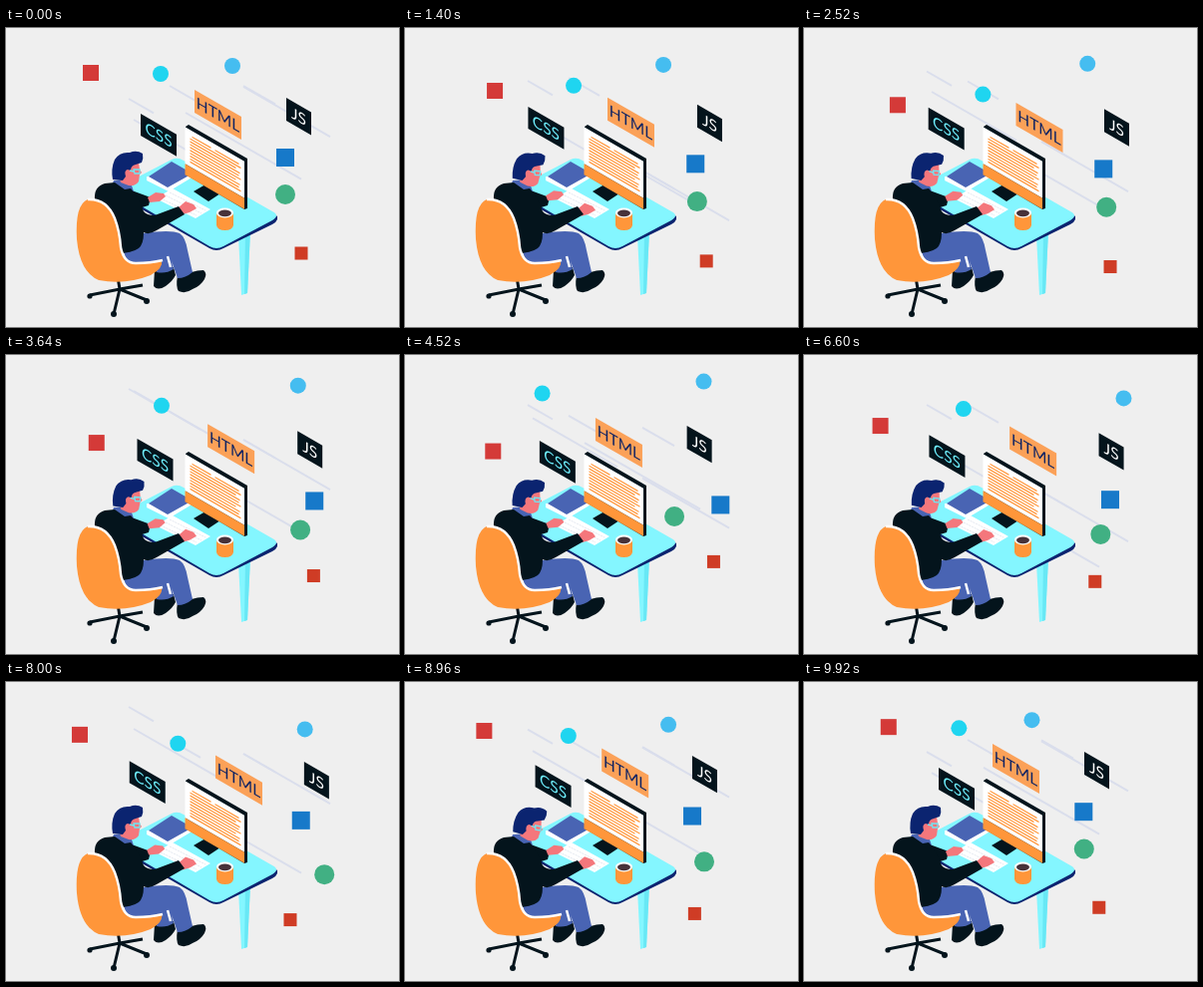
Animation, 394 px wide and 300 px high, one loop 9960 ms. Source, as an HTML page:

```html
<!DOCTYPE html>
<html lang="en">
<head>
<meta charset="utf-8">
<title>Developer at work</title>
<style>
html, body { margin: 0; width: 100%; height: 100%; overflow: hidden; background: #efefef; }
svg { display: block; width: 100vw; height: 100vh; }
text { font: 15.5px Lato, sans-serif; text-anchor: middle; }
.track { stroke: #dadeec; stroke-width: 2; }
.ink { fill: #04141c; }
.navy { fill: #0b2470; }
.blue { fill: #4964b3; }
.aqua { fill: #84f6ff; }
.orange { fill: #ff963a; }
.skin { fill: #f4777c; }
.white { fill: #fff; }
</style>
</head>
<body>
<svg viewBox="0 0 394 300" preserveAspectRatio="none">
  <g id="tracks"></g>
  <g id="plates"></g>
  <g id="icons"></g>

  <g id="desk">
    <path class="aqua" d="M233 208L245 203L242 266L236 268Z"/>
    <path fill="#68e8f5" d="M240 205L245 203L242 266L239 267Z"/>
    <path class="navy" d="M112 163L166 135Q172 132 178 136L267 186Q271 188 272 189V192Q271 195 267 197L218 221Q211 225 204 221L112 168Z"/>
    <path class="aqua" d="M112 160L166 132Q172 129 178 133L267 184Q275 188 267 193L218 219Q211 223 204 219L112 165Z"/>
    <path class="white" d="M141 149L187 146L188 149L163 164L141 153Z"/>
    <path class="blue" d="M143 149L166 134L187 146L162 160Z"/>
    <path class="ink" d="M188 164L200 157L215 166L203 174Z"/>
    <path class="white" d="M150 171L167 161L205 182L190 191Z"/>
    <path d="M155 171L191 188M160 168L196 186M164 165L200 183" fill="none" stroke="#e3e8f0" stroke-dasharray="2 1"/>
    <path class="orange" d="M211 186V198Q212 203 219.500 203T228 198V186Z"/>
    <ellipse class="white" cx="219.500" cy="185.500" rx="8.500" ry="5"/>
    <ellipse cx="219.500" cy="185.800" rx="6.500" ry="3.400" fill="#47323a"/>
  </g>

  <g id="monitor">
    <path class="ink" d="M180 99L183 97L242 131V181L239 182L180 147Z"/>
    <g transform="translate(179.500 99.300) skewY(30)">
      <path class="white" d="M0 0H59.500V37H0Z"/>
      <path class="orange" d="M0 37H59.500V48H0Z"/>
      <g id="code" stroke="#ff963a" stroke-width="1.400"></g>
    </g>
  </g>

  <g id="man">
    <path class="ink" d="M126 163L145 170L143 178L130 182Z"/>
    <path id="farHand" class="skin" d="M141 169L149 164L157 165L159 168L153 173L143 174Z"/>
    <path class="ink" d="M149 243L148 259Q152 264 160 259Q167 254 170 248L168 240Z"/>
    <path class="ink" d="M172 248Q170 260 173 264Q180 267 187 262Q195 259 199 252Q202 246 198 243Q192 243 186 245Z"/>
    <path class="blue" d="M114 212L137 206Q165 202 174 206Q180 210 182 223L187 245Q180 251 172 251L166 234L168 242Q160 247 151 245L149 237H122Z"/>
    <path d="M162 229L165 240" stroke="#fff" stroke-width="2.500"/>
    <path class="blue" d="M108 153L124 152L128 164L117 167L106 158Z"/>
    <g id="head">
      <path class="skin" d="M113 146L122 138L133 135L134 142L136 145L134 147L133 154Q130 159 123 158L115 155Z"/>
      <path class="navy" d="M107 152Q105 141 109 132Q114 124 124 125Q131 122 137 126Q138 131 136 135L130 137Q125 138 125 143L122 142Q118 143 120 149L117 153Z"/>
      <path d="M124 143L128 144M128 142H134V146H129Z" fill="none" stroke="#6fe6f2" stroke-width="1.300"/>
    </g>
    <path id="nearHand" class="skin" d="M173 181L180 175L188 178L191 182L184 186L177 188Z"/>
    <path class="ink" d="M89 172Q88 159 99 156L109 155L119 162L125 161Q132 168 138 184Q141 188 149 188L173 179L179 187L151 203Q143 208 138 205Q138 217 133 221Q126 226 112 226Z"/>
  </g>

  <g id="chair">
    <path d="M112 250L114 262M84 268L114 262L141 273M114 262L108 287M114 262L137 258" fill="none" stroke="#04141c" stroke-width="3"/>
    <g class="ink"><circle cx="84" cy="269" r="2.600"/><circle cx="108" cy="287" r="3"/><circle cx="141" cy="274" r="3"/></g>
    <path class="orange" d="M71 212Q69 177 82 172Q101 171 109 191Q114 204 115 220Q118 236 130 236Q145 236 156 233Q158 241 145 248Q120 258 93 253Q74 245 71 212Z"/>
    <path d="M82 172Q101 171 109 191Q114 204 115 220Q118 236 130 236Q145 236 157 233" fill="none" stroke="#fff" stroke-width="2.400"/>
  </g>
</svg>
<script>
const LOOP = 9960, STEP = 40, QUARTER = LOOP / 4, SLOPE = 0.575;
const $ = id => document.getElementById(id);
const linear = p => p;
const sine = p => (1 - Math.cos(Math.PI * p)) / 2;

function add(parent, tag, attrs, text = '') {
  const el = document.createElementNS('http://www.w3.org/2000/svg', tag);
  for (const key in attrs) el.setAttribute(key, attrs[key]);
  el.textContent = text;
  parent.append(el);
  return el;
}

// Keys are [time, x, y]; the last one leads back to the first.
function along(keys, t, ease) {
  const i = keys.findLastIndex(k => k[0] <= t);
  const a = keys[i], b = keys[i + 1] || [LOOP, ...keys[0].slice(1)];
  const p = ease((t - a[0]) / (b[0] - a[0]));
  return [a[1] + (b[1] - a[1]) * p, a[2] + (b[2] - a[2]) * p];
}

const quarters = points => points.map((p, i) => [i * QUARTER, ...p]);
const sway = (x, y, dx, dy, times = [0, 1, 2, 3].map(n => n * QUARTER)) =>
  times.map((t, i) => [t, x + i % 2 * dx, y + i % 2 * dy]);

const movers = [];
const move = (el, keys, ease = linear) => movers.push({ el, keys, ease });

function plate(label, w, h, fill, ink, keys) {
  const g = add($('plates'), 'g', {});
  const face = add(g, 'g', { transform: `skewY(${Math.atan(SLOPE) * 180 / Math.PI})` });
  add(face, 'rect', { width: w, height: h, fill });
  add(face, 'text', { x: w / 2, y: h / 2 + 5.5, fill: ink }, label);
  move(g, keys, sine);
}

function dot(r, fill, keys) {
  move(add($('icons'), 'circle', { r, fill }), keys);
}

function tile(size, fill, keys) {
  move(add($('icons'), 'rect', { x: -size / 2, y: -size / 2, width: size, height: size, fill }), keys);
}

// Each track keeps its x and slides up and down.
function track(x, length, heights) {
  const times = [0, 1400, 3640, 5440, 6600, 8000];
  const el = add($('tracks'), 'line', { class: 'track', x2: length, y2: length * SLOPE });
  move(el, times.map((t, i) => [t, x, heights[i]]));
}

track(123, 25, [71, 53, 34, 67, 50, 25]);
track(128, 85, [92, 92, 36, 92, 92, 47]);
track(164, 31, [58, 50, 57, 65, 50, 58]);
track(238, 32, [58, 143, 85, 60, 137, 72]);
track(238, 87, [59, 143, 85, 164, 137, 72]);
track(180, 116, [85, 113, 111, 64, 146, 125]);

plate('HTML', 47, 23, '#fba158', '#0b2264', sway(189, 62, 23.5, 13));
plate('CSS', 36, 22, '#04141c', '#6ff0ff', sway(135, 86, -12.5, -7.5, [0, 1700, 4700, 7500]));
plate('JS', 25, 23, '#04141c', '#fff', sway(281, 70, 20, 11.3));

tile(16, '#d43a38', quarters([[85, 45], [94, 77], [87, 101], [71, 55]]));
dot(8, '#1fd5f0', quarters([[155, 46], [180, 67], [128, 32], [177, 66]]));
dot(8, '#45bdf0', [[0, 227, 38], [QUARTER, 284, 36], [4980, 303, 24.5], [7250, 327.5, 51]]);
tile(18, '#1779c9', [[0, 280, 130], [4980, 320, 152.5]]);
dot(10, '#41b083', [[0, 280, 167], [3150, 309, 183], [4980, 257, 155], [7710, 325, 197]]);
tile(13, '#cf3c25', quarters([[296, 226], [307, 240], [310, 200], [282, 242]]));

for (let i = 0; i < 10; i++) {
  const y = 6 + i * 2.9, end = [54, 56, 51, 55][i % 4];
  add($('code'), 'line', { x1: i ? 5 : 7, x2: i ? end : 26, y1: y, y2: y });
  if (!i) add($('code'), 'line', { x1: 30, x2: 54, y1: y, y2: y });
}

const place = (el, x, y) => el.setAttribute('transform', `translate(${x.toFixed(2)} ${y.toFixed(2)})`);

function draw(now) {
  const t = Math.floor(now % LOOP / STEP) * STEP;
  const cycle = count => sine(2 * count * t / LOOP);
  for (const { el, keys, ease } of movers) place(el, ...along(keys, t, ease));
  const tap = cycle(17);
  place($('nearHand'), 0, tap * 2 - 1);
  place($('farHand'), 1 - tap, 1 - tap * 2);
  $('head').setAttribute('transform', `rotate(${(cycle(5) * 10).toFixed(2)} 118 158)`);
  requestAnimationFrame(() => draw(performance.now() - start));
}

const start = performance.now();
draw(0);
</script>
</body>
</html>
```
